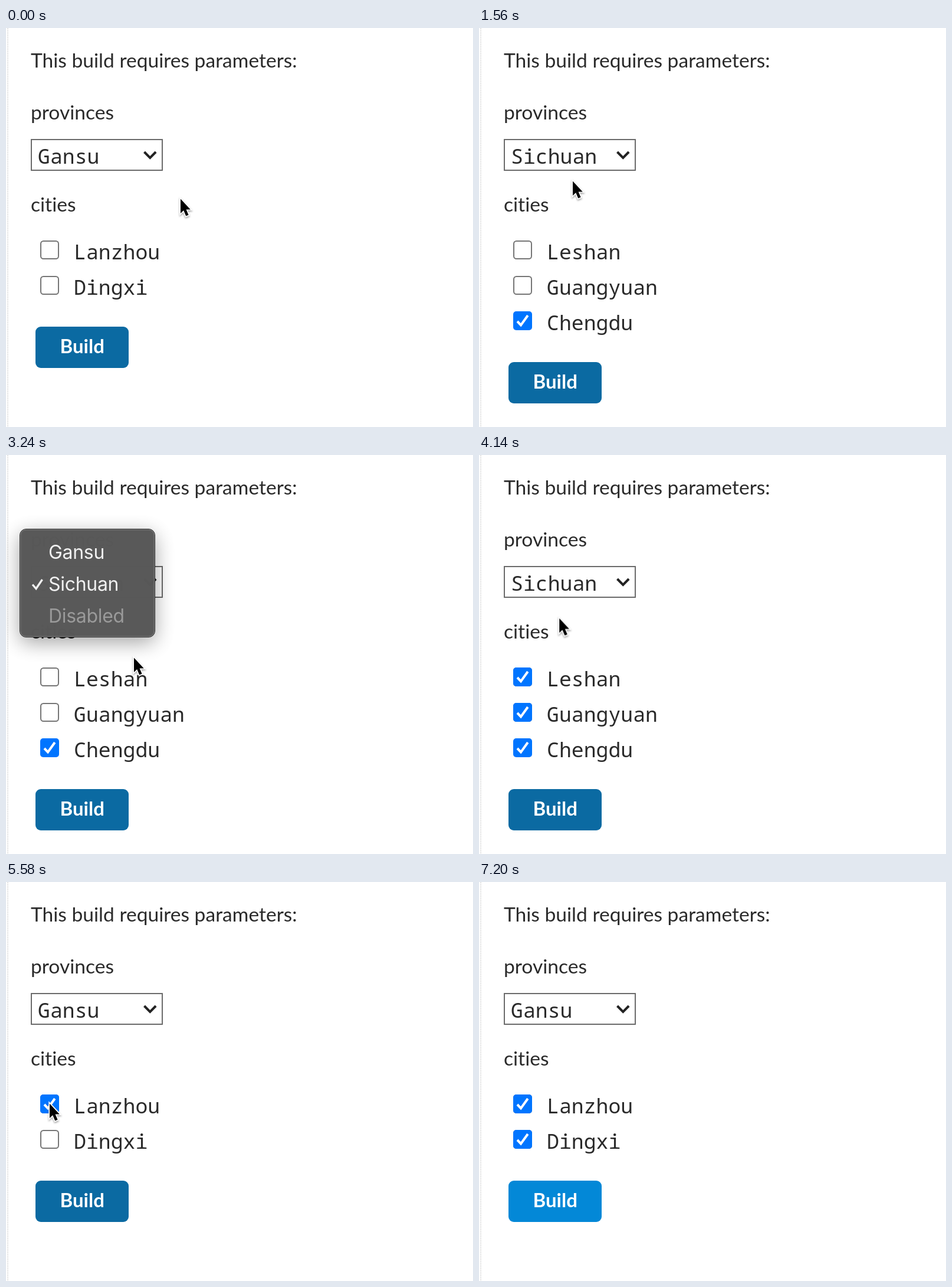
An HTML page that plays this animation: 792 by 676 pixels, repeating every 7.26 s.

```html
<!DOCTYPE html>
<html lang="en">
<head>
<meta charset="utf-8">
<title>Build parameters</title>
<style>
html, body { margin: 0; width: 100%; height: 100%; overflow: hidden; background: #fff; }
svg { display: block; width: 792px; height: 676px; }

text { fill: #2a2a2a; font-variant-ligatures: none; }
.label { font: 33.6px Lato, sans-serif; font-variant-ligatures: none; }
.mono { font: 34.8px "Noto Sans Mono", monospace; }
.menu text { font: 32px Inter, sans-serif; letter-spacing: -.3px; fill: #f2f2f2; }
.menu .off { fill: #9a9a9a; }
.caption { font: bold 33px Lato, sans-serif; fill: #fff; }
.line { fill: none; stroke-linecap: butt; stroke-linejoin: miter; }
.box { fill: #fff; stroke: #767676; stroke-width: 2; }
.panel { fill: #585858; stroke: #1f1f1f; filter: drop-shadow(0 9px 17px rgba(0, 0, 0, .36)); }
.rim { fill: none; stroke: #878787; }
.pointer { filter: drop-shadow(0 2px 1.5px rgba(0, 0, 0, .35)); }
.arrow { fill: #000; stroke: #fff; stroke-width: 3.4; paint-order: stroke; }
.hand { fill: #fff; stroke: #000; stroke-width: 2; stroke-linejoin: round; }

/* Every part shares one 7260 ms clock: 1% is 72.6 ms. */
.state { animation: 7260ms step-end infinite; }
.flow { animation: 7260ms linear infinite; }

.value-b { animation-name: value-b; }
.value-a { animation-name: value-a; }
.list-b { animation-name: list-b; }
.list-a { animation-name: list-a; }
.drop { animation-name: drop; }
.leshan, .guangyuan, .lanzhou, .dingxi { opacity: 0; }
.leshan { animation-name: leshan; }
.guangyuan { animation-name: guangyuan; }
.lanzhou { animation-name: lanzhou; }
.dingxi { animation-name: dingxi; }
.menu { animation-name: menu; }
.shift { animation-name: shift; }
.hover { fill: #1767d2; animation-name: hover; }
.button { animation-name: button; }
.pointer { animation-name: pointer; animation-timing-function: ease-in-out; }
.arrow { animation-name: arrow; }
.hand-on { animation-name: hand-on; }

@keyframes value-b { 0%, 71.9%, to { opacity: 0 } 16.53% { opacity: 1 } }
@keyframes value-a { 0%, 71.9%, to { opacity: 1 } 16.53% { opacity: 0 } }
@keyframes list-b { 0%, 75.21%, to { opacity: 0 } 19.83% { opacity: 1 } }
@keyframes list-a { 0%, 75.21%, to { opacity: 1 } 19.83% { opacity: 0 } }
@keyframes drop { 0%, 75.21%, to { transform: none } 19.83% { transform: translateY(60px) } }

@keyframes leshan { 49.59% { opacity: 1 } }
@keyframes guangyuan { 52.89% { opacity: 1 } }
@keyframes lanzhou { 76.86% { opacity: 1 } }
@keyframes dingxi { 78.51% { opacity: 1 } }

@keyframes menu {
  0%, 6.6% { opacity: 0 }
  6.61%, 13.22% { opacity: 1 }
  15.7%, 25.61% { opacity: 0 }
  25.62%, 44.63% { opacity: 1 }
  47.11%, 60.32% { opacity: 0 }
  60.33%, 68.6% { opacity: 1 }
  71.07% { opacity: .06 }
  71.9%, to { opacity: 0 }
}
@keyframes shift { 0% { transform: translateY(54px) } 20%, to { transform: none } }
@keyframes hover {
  0%, 25.62%, 60.33% { opacity: 1; transform: none }
  12.6% { opacity: 1; transform: translateY(54px) }
  64.46% { opacity: 1; transform: translateY(-54px) }
  13.22%, 29.6%, 68.6%, to { opacity: 0; transform: none }
}
@keyframes button {
  0%, 86% { fill: #0b6aa2 }
  88.43% { fill: #1c80bc }
  90.08%, to { fill: #0388d7 }
}

@keyframes pointer {
  0% { transform: translate(294px, 286px) }
  5.79%, 8% { transform: translate(165px, 212px) }
  11.57% { transform: translate(163px, 222px) }
  12.81%, 21.5% { transform: translate(157px, 256px) }
  23.97%, 27% { transform: translate(165px, 214px) }
  32.23%, 34.71% { transform: translate(156px, 284px) }
  38% { transform: translate(190px, 276px) }
  42% { transform: translate(150px, 280px) }
  44%, 45% { transform: translate(215px, 340px) }
  49%, 50.2% { transform: translate(72px, 372px) }
  52.4% { transform: translate(72px, 432px) }
  53.4% { transform: translate(72px, 432px); animation-timing-function: ease-in }
  57.02% { transform: translate(134px, 274px); animation-timing-function: ease-out }
  59.5%, 62% { transform: translate(150px, 212px) }
  65% { transform: translate(120px, 160px) }
  68% { transform: translate(120px, 160px); animation-timing-function: ease-in }
  71.07% { transform: translate(114px, 357px); animation-timing-function: ease-out }
  73.5%, 77% { transform: translate(72px, 372px) }
  78.2%, 81.82% { transform: translate(72px, 432px) }
  85.95% { transform: translate(133px, 567px) }
  91.74% { transform: translate(133px, 567px); animation-timing-function: ease-in }
  92.56% { transform: translate(200px, 585px); animation-timing-function: linear }
  94.21% { transform: translate(740px, 610px); animation-timing-function: linear }
  95.04%, to { transform: translate(810px, 625px) }
}
@keyframes arrow { 0%, 92.4%, to { opacity: 1 } 84.1% { opacity: 0 } }
@keyframes hand-on { 0%, 92.4%, to { opacity: 0 } 84.1% { opacity: 1 } }
</style>
</head>
<body>
<svg viewBox="0 0 792 676">
  <defs>
    <rect id="box" class="box" x="59" y="361" width="30" height="30" rx="4.5"/>
    <g id="check">
      <rect x="58" y="360" width="32" height="32" rx="5" fill="#0075ff"/>
      <path class="line" d="M65 377l6 6.3 11.8-16.3" stroke="#fff" stroke-width="4"/>
    </g>
  </defs>

  <path d="M3 0V676" stroke="#e4e4e4" stroke-width="2" stroke-dasharray="2 1"/>
  <text class="label" x="42" y="67">This build requires parameters:</text>
  <text class="label" x="42" y="154.5">provinces</text>
  <text class="label" x="42" y="310.5">cities</text>

  <rect x="43" y="189" width="222" height="52" fill="#fff" stroke="#6b6b6b" stroke-width="2"/>
  <text class="mono state value-a" x="54" y="230">Gansu</text>
  <text class="mono state value-b" x="54" y="230">Sichuan</text>
  <path class="line" d="M234.5 210l9.8 9.8 9.8-9.8" stroke="#222" stroke-width="4"/>

  <use href="#box"/>
  <use href="#box" y="60"/>

  <g class="state list-a">
    <text class="mono" x="115" y="392">Lanzhou</text>
    <text class="mono" x="115" y="452">Dingxi</text>
    <use class="state lanzhou" href="#check"/>
    <use class="state dingxi" href="#check" y="60"/>
  </g>

  <g class="state list-b">
    <text class="mono" x="115" y="392">Leshan</text>
    <text class="mono" x="115" y="452">Guangyuan</text>
    <text class="mono" x="115" y="512">Chengdu</text>
    <use class="state leshan" href="#check"/>
    <use class="state guangyuan" href="#check" y="60"/>
    <use href="#check" y="120"/>
  </g>

  <g class="state drop">
    <rect class="flow button" x="50" y="506" width="158" height="70" rx="9"/>
    <text class="caption" x="91.5" y="550.5">Build</text>
  </g>

  <g class="flow menu">
    <g class="state shift">
      <rect class="panel" x="23.5" y="125.5" width="229" height="183" rx="10.5"/>
      <rect class="rim" x="24.5" y="126.5" width="227" height="181" rx="9.5"/>
    </g>
    <rect class="state hover" x="33" y="191" width="210" height="54" rx="8"/>
    <g class="state shift">
      <text x="72" y="176">Gansu</text>
      <text x="72" y="230">Sichuan</text>
      <text class="off" x="72" y="284">Disabled</text>
    </g>
    <path class="line" d="M45 219.5l6 7L61.5 211" stroke="#f2f2f2" stroke-width="3.4"/>
  </g>

  <g class="flow pointer">
    <path class="state arrow" d="M2 3.5V28l5.2-5 4 9.6 4.4-1.8-4-9.4H18.8Z"/>
    <g class="state hand-on">
      <path class="hand" d="M-3 5c-.5-3.5 4.5-4 5.5-.5L5.5 14c2-2 4.5-1.5 5 .8 2-1.6 4.3-1 4.8 1 2-1.2 4.7 0 4.7 3 .3 5-1 7-2.5 10l-.5 4H4c-2-4-6-6-8.500-10-2-3-4-4-4-6.500 0-3 4-3 8 1.500Z"/>
      <path class="hand" d="M6 18.500v8M10 18.500v8M14 18.500v8"/>
    </g>
  </g>
</svg>
</body>
</html>
```
